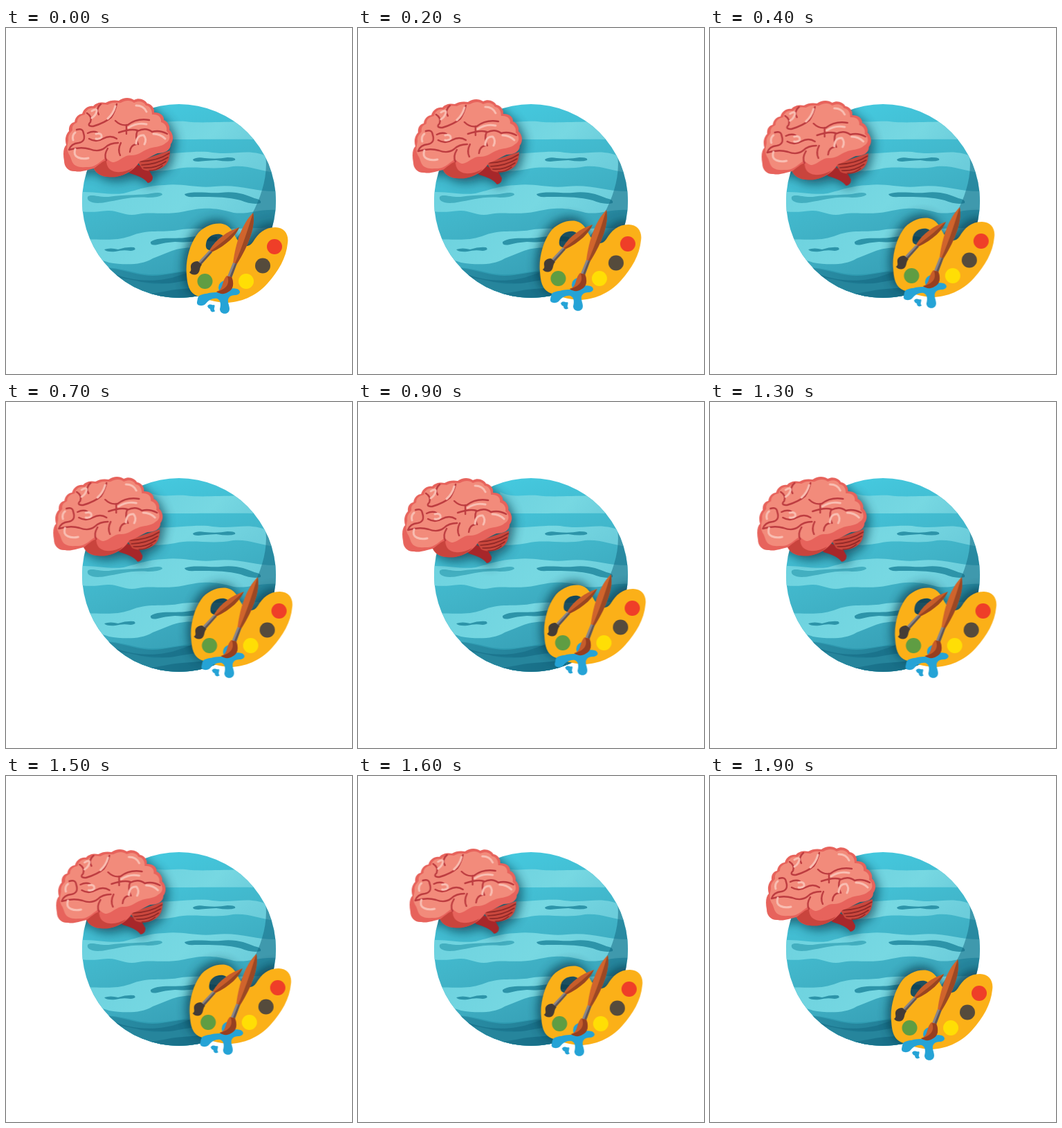
Animation of 500 by 500 pixels, one loop 2 s. Source, as an HTML page:

```html
<!DOCTYPE html>
<html lang="en">
<head>
<meta charset="utf-8">
<title>Brain, planet and palette</title>
<style>
  html, body { margin: 0; width: 100%; height: 100%; overflow: hidden; background: #fff; }
  svg { display: block; width: 100%; height: 100%; }
  .brain { animation: brain 2s steps(10) infinite; }
  .palette { animation: palette 2s steps(10) infinite; }
  @keyframes brain { 50% { transform: translate(-21px, 10px); } }
  @keyframes palette { 50% { transform: translate(9.3px, -20px); } }
  .line { fill: none; stroke-linecap: round; stroke-linejoin: round; }
</style>
</head>
<body>
<svg viewBox="0 0 500 500">
  <defs>
    <linearGradient id="sea" x1=".25" y1="0" x2=".65" y2="1">
      <stop offset="0" stop-color="#45cbe1"/>
      <stop offset=".5" stop-color="#41b4c8"/>
      <stop offset="1" stop-color="#349ab1"/>
    </linearGradient>
    <linearGradient id="wave" x1="0" y1="0" x2="1" y2=".15">
      <stop offset="0" stop-color="#6dd2df"/>
      <stop offset=".6" stop-color="#77d8e2"/>
      <stop offset="1" stop-color="#6ccddb"/>
    </linearGradient>
    <linearGradient id="deep" x1="0" y1="0" x2="1" y2="0">
      <stop offset="0" stop-color="#2b91a8"/>
      <stop offset="1" stop-color="#1b718a"/>
    </linearGradient>
    <filter id="blur" x="-30%" y="-30%" width="160%" height="160%">
      <feGaussianBlur stdDeviation="8"/>
    </filter>
    <clipPath id="globe"><circle cx="250" cy="250" r="140"/></clipPath>
    <path id="brainShape" d="M84 192C82 181 83 173 87 169C84 159 88 152 91 149C90 140 96 136 99 136C100 128 106 124 110 124C113 115 120 112 126 113C131 107 139 107 144 108C150 104 158 104 163 105C170 100 179 100 185 104C193 100 201 104 204 109C211 110 215 117 214 122C224 122 229 128 228 133C235 136 237 143 236 147C243 154 242 163 238 168C240 175 237 181 235 183C236 191 232 198 227 201C221 206 214 208 208 207L212 215Q212 223 205 223C200 217 191 213 181 210C171 214 158 218 147 215C137 214 130 209 127 203C116 205 109 209 100 207C91 208 84 201 84 192Z"/>
    <path id="paletteShape" d="M261 356C259 338 265 314 275 300C284 287 300 281 313 283C326 286 329 298 335 307C341 317 351 318 357 309C364 297 374 288 389 288C403 288 409 299 407 311C405 332 394 351 378 369C361 388 338 397 317 397C302 396 288 392 276 387C264 382 262 370 261 356ZM289 312C290 302 299 297 309 298C319 300 316 309 310 312C304 315 303 321 295 321C291 321 288 318 289 312Z"/>
  </defs>

  <g clip-path="url(#globe)">
    <path fill="url(#sea)" d="M110 110H390V390H110Z"/>
    <g fill="url(#wave)">
      <path d="M205 130C223 139 239 134 259 135C288 139 319 133 390 137V162C345 160 310 161 210 161Z"/>
      <path d="M200 180C240 184 265 177 292 179C318 184 340 178 356 180C370 181 380 187 390 189V209C365 206 350 198 328 200C298 206 269 198 244 204C213 210 170 205 108 207V190Z"/>
      <path d="M108 237C132 236 149 242 170 239C191 234 203 228 229 227C256 224 274 232 302 229C336 225 362 237 392 236V263C365 261 350 270 329 267C301 259 285 259 258 265C230 271 211 265 191 269C171 273 163 263 147 264C133 265 125 267 108 265Z"/>
      <path d="M108 306C139 304 154 309 179 301C205 290 227 296 248 292C280 287 300 293 392 288V313C345 310 309 322 276 318C247 315 232 326 212 333C194 344 168 342 149 339C137 335 128 332 108 332Z"/>
    </g>
    <path fill="#2f9bb1" d="M108 345C150 344 167 349 190 354C223 360 246 351 270 349C310 347 344 333 392 337V395H108Z"/>
    <path fill="url(#deep)" d="M108 345C153 343 172 353 199 357C224 361 242 352 264 352C310 350 345 336 392 340V369H230C210 369 190 366 157 363L108 364Z"/>
    <path fill="#3aa5ba" d="M150 361C183 360 198 371 222 370C245 370 260 362 300 362V392H150Z"/>
    <path fill="url(#deep)" d="M170 382C205 390 225 379 255 377C275 376 285 374 300 373V394H170Z"/>
    <g fill="#2d94a9">
      <path d="M270 190Q276 186 287 188Q306 190 320 187Q333 187 331 191Q323 194 304 191Q286 192 278 193Q270 193 270 190Z"/>
      <path fill="#43afc0" d="M118 244C122 239 135 245 148 244C174 240 197 242 210 239Q226 236 226 241Q221 245 205 245C180 243 163 249 143 252C125 255 116 250 118 244Z"/>
      <path d="M258 240C271 235 291 239 310 238C332 235 347 241 359 246Q370 248 368 253Q356 256 339 249C315 243 291 244 273 244Q259 245 258 240Z"/>
      <path d="M142 320Q151 317 162 320Q174 316 185 317Q190 321 180 322Q169 320 158 323Q145 324 142 320Z"/>
      <path d="M209 309C220 301 241 305 259 303Q283 299 305 302V309C278 306 263 311 244 309Q229 310 219 313Q208 315 209 309Z"/>
    </g>
    <path fill="#126780" opacity=".5" d="M374 178C380 208 371 240 355 270C330 315 304 340 252 357C220 369 180 367 149 352L185 392H392V178Z"/>
    <g class="brain"><use href="#brainShape" x="4" y="5" fill="#073748" opacity=".75" filter="url(#blur)"/></g>
    <g class="palette"><use href="#paletteShape" x="-3" y="-4" fill="#073748" opacity=".85" filter="url(#blur)"/></g>
  </g>

  <g class="brain">
    <path fill="#a7272a" d="M174 204L189 197L207 206L212 215Q212 223 205 224C200 217 190 213 179 210Z"/>
    <path fill="#ca473d" d="M190 193L237 177C237 190 233 197 227 201C217 208 205 208 197 204Z"/>
    <path class="line" stroke="#8f2827" stroke-width="1.6" d="M194 193Q219 192 236 181M196 198Q218 197 234 187M199 202Q217 203 231 193M207 206Q218 206 226 199"/>
    <path fill="#e7635c" d="M84 192C82 181 83 173 87 169C84 159 88 152 91 149C90 140 96 136 99 136C100 128 106 124 110 124C113 115 120 112 126 113C131 107 139 107 144 108C150 104 158 104 163 105C170 100 179 100 185 104C193 100 201 104 204 109C211 110 215 117 214 122C224 122 229 128 228 133C235 136 237 143 236 147C243 154 242 163 238 168C238 177 229 181 219 181C210 185 201 191 193 193C186 205 171 215 153 215C138 216 130 210 127 203C116 205 109 209 100 207C91 208 84 201 84 192Z"/>
    <path fill="#c9443d" d="M127 203C134 198 139 193 145 191C145 201 150 207 160 208C168 209 176 206 184 202C173 214 158 217 146 215C136 214 130 209 127 203Z"/>
    <path fill="#f28b7b" d="M92 184C85 173 91 165 90 160C90 152 95 151 96 147C95 139 101 138 103 136C103 128 110 126 114 125C116 116 123 115 128 116C134 110 141 110 147 111C155 106 161 109 166 108C173 104 180 104 185 108C193 104 200 107 202 112C209 113 211 119 211 125C221 124 225 130 224 136C231 138 233 144 232 149C239 155 237 163 231 166C224 173 212 171 205 175C196 178 192 184 181 184C171 183 165 192 156 194C149 194 147 187 142 189C135 194 130 200 120 201C112 201 106 202 101 199C95 196 95 190 92 184Z"/>
    <path class="line" stroke="#bd3c40" stroke-width="2.4" d="M117 123Q125 128 122 136Q116 142 126 142Q143 137 152 129Q157 122 160 110M137 110Q129 117 134 125M158 134Q166 142 176 140Q189 130 207 133M174 140V153M163 151Q181 145 190 148Q186 158 191 168M190 149Q202 143 211 150Q222 147 233 153M102 147Q111 144 112 152Q116 164 105 166Q94 167 91 176Q108 171 121 175Q134 180 143 173Q150 166 162 166M118 152Q126 148 132 151M120 160Q130 166 140 160Q151 154 160 160M147 174Q141 184 145 191M166 166Q161 176 165 184M188 168Q180 169 179 179"/>
    <path class="line" stroke="#f9beb2" stroke-width="3" d="M124 120Q132 115 131 121Q129 127 124 130M158 113Q155 124 147 131M188 112Q199 112 203 121M177 144Q189 136 203 139M130 153Q139 151 138 158Q135 161 130 160M188 167Q189 154 199 155Q204 161 200 168M213 153Q223 153 230 160M97 162Q95 155 100 151M100 175Q97 184 104 187Q111 190 119 188"/>
  </g>

  <g class="palette">
    <use href="#paletteShape" fill="#fbb018" fill-rule="evenodd"/>
    <circle cx="388" cy="316" r="11" fill="#ef3e28"/>
    <circle cx="371" cy="343.5" r="11" fill="#554b3c"/>
    <circle cx="347" cy="366" r="11" fill="#ffde05"/>
    <circle cx="287.5" cy="366" r="11" fill="#5f9d43"/>
    <circle cx="317" cy="375" r="10" fill="#25a3d6"/>
    <path fill="#25a3d6" d="M277 391C278 384 287 385 293 383C302 381 308 383 317 381C324 378 326 375 334 377C341 380 338 386 331 386C324 386 320 390 321 396C322 402 325 407 321 411C316 415 309 412 309 406C311 399 310 393 305 391C299 390 293 393 289 398C285 403 275 402 276 396ZM291 402C294 397 297 401 301 400C303 403 299 405 302 409C299 412 295 410 295 406Q292 405 291 402Z"/>
    <path fill="#c75d2a" d="M337 288C333 299 319 314 297 324L294 321C304 304 320 294 337 288Z"/>
    <path fill="#984521" d="M337 288C326 298 314 309 296 322L297 324C319 314 333 299 337 288Z"/>
    <path fill="#8c8587" d="M294 321L298 324L282 342L278 338Z"/>
    <path fill="#5e5557" d="M296 322.5L298 324L282 342L280 340Z"/>
    <path fill="#443b36" d="M277 337L283 342C279 347 281 351 277 355C272 358 267 356 265 353C270 350 265 346 268 341Q271 337 277 337Z"/>
    <path fill="#d0642c" d="M357 267C361 285 352 312 333 342L328 340C332 308 342 282 357 267Z"/>
    <path fill="#9b4824" d="M357 267C350 289 343 313 330.500 341L333 342C352 312 361 285 357 267Z"/>
    <path fill="#89858a" d="M328 339L333.500 341L326 361L320 359Z"/>
    <path fill="#5e5559" d="M331 340L333.500 341L326 361L323 360Z"/>
    <path fill="#c75d2a" d="M319 358L326 360C330 369 328 378 320 382C315 385 309 384 304 381C315 378 311 366 319 358Z"/>
    <path fill="#963f21" d="M320 359C324 370 318 378 304 381C310 385 315 385 320 382C329 378 330 369 326 360Z"/>
  </g>
</svg>
</body>
</html>
```
